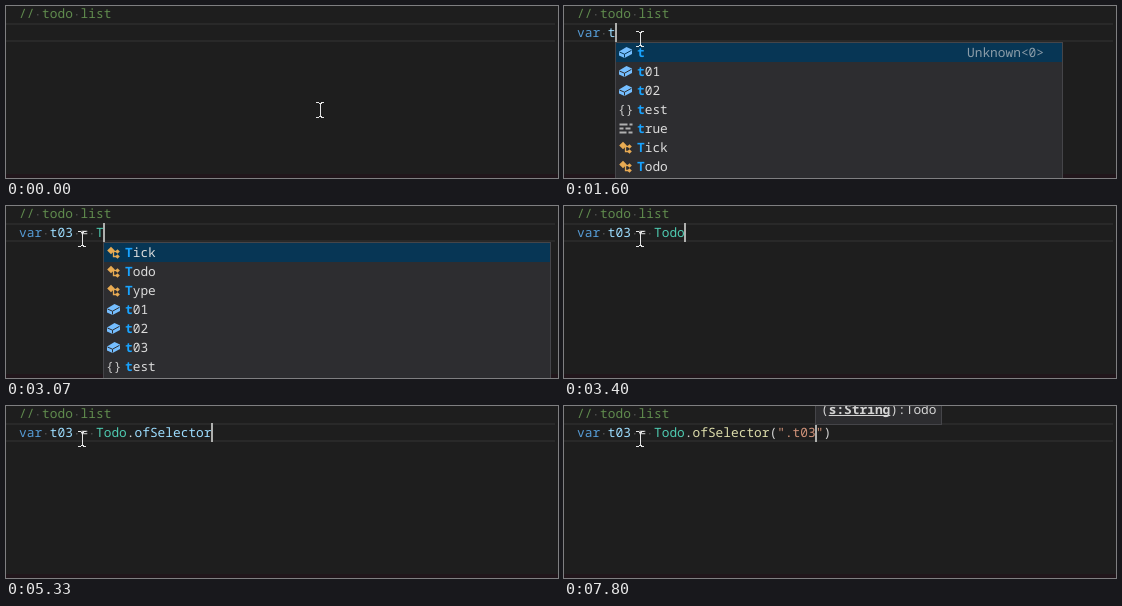
These frames come from a looping animation (552x172 px, 8 s). An HTML page with a canvas:

```html
<!DOCTYPE html>
<html lang="en">
<head>
<meta charset="utf-8">
<title>Code completion</title>
<style>
html, body { margin: 0; width: 552px; height: 172px; overflow: hidden; background: #1e1e1e; }
canvas { display: block; }
</style>
</head>
<body>
<canvas id="stage" width="552" height="172"></canvas>
<script>
const ctx = document.getElementById('stage').getContext('2d');
const LOOP = 8000, STEP = 200 / 3, LEFT = 13, CHAR = 7.7, ROW = 19;
const FONT = '12.83px "Noto Sans Mono", "DejaVu Sans Mono", monospace';
ctx.textRendering = 'geometricPrecision';

// [time, text before the cursor, text after it]
const edits = [
  [0, ''], [1000, 'v'], [1070, 'va'], [1270, 'var'], [1330, 'var '],
  [1470, 'var t'], [1730, 'var t0'], [1800, 'var t03'], [2070, 'var t03 '],
  [2270, 'var t03 ='], [2530, 'var t03 = '], [2930, 'var t03 = T'],
  [3130, 'var t03 = To'], [3330, 'var t03 = Tod'], [3400, 'var t03 = Todo'],
  [3870, 'var t03 = Todo.'], [5330, 'var t03 = Todo.ofSelector'],
  [5870, 'var t03 = Todo.ofSelector(', ')'],
  [6330, 'var t03 = Todo.ofSelector("', '")'],
  [7330, 'var t03 = Todo.ofSelector(".', '")'],
  [7470, 'var t03 = Todo.ofSelector(".t', '")'],
  [7670, 'var t03 = Todo.ofSelector(".t0', '")'],
  [7730, 'var t03 = Todo.ofSelector(".t03', '")'],
];
const cursorOff = [[0, 470], [930, 1000], [4330, 4800], [5800, 5870], [6930, 7330]];

const members = ['method create', 'method ofSelector'];
const lists = [
  { from: 1200, to: 1270, x: 28, match: 2, rows: ['keyword var', 'variable val'] },
  { from: 1600, to: 1730, x: 51, match: 1, detail: 'Unknown<0>',
    rows: ['variable t', 'variable t01', 'variable t02', 'braces test', 'keyword true', 'class Tick', 'class Todo', ''] },
  { from: 3070, to: 3130, x: 97, match: 1,
    rows: ['class Tick', 'class Todo', 'class Type', 'variable t01', 'variable t02', 'variable t03', 'braces test', ''] },
  { from: 3270, to: 3330, x: 105, match: 2, rows: ['class Todo', 'class Tools', 'class Token'] },
  { from: 3930, to: 4470, x: 112, rows: members, detail: 'create():Todo' },
  { from: 4470, to: 5330, x: 112, rows: members, selected: 1, detail: 'ofSelector(s:String):Todo' },
];
const hints = [[6070, 213], [6400, 220], [7330, 226], [7400, 228], [7530, 236], [7730, 243], [7800, 251]];

const latest = (list, t) => list.filter(e => e[0] <= t).pop();

function rect(x, y, w, h, color) {
  ctx.fillStyle = color;
  ctx.fillRect(x, y, w, h);
}

function frame(x, y, w, h, color) {
  ctx.strokeStyle = color;
  ctx.lineWidth = 1;
  ctx.strokeRect(x + .5, y + .5, w - 1, h - 1);
}

function text(s, x, y, color, weight = '') {
  ctx.font = weight + ' ' + FONT;
  ctx.fillStyle = color;
  ctx.fillText(s, x, y);
}

function path(points, color, { fill = false, close = fill, width = 1 } = {}) {
  ctx.beginPath();
  for (let i = 0; i < points.length; i += 2) ctx.lineTo(points[i], points[i + 1]);
  if (close) ctx.closePath();
  ctx.lineWidth = width;
  ctx.fillStyle = ctx.strokeStyle = color;
  fill ? ctx.fill() : ctx.stroke();
}

const diamond = (x, y, r, color) =>
  path([x - r, y, x, y - r, x + r, y, x, y + r], color, { fill: true });

const icons = {
  variable(bg) {
    path([-6.5, -1, 1, -5.5, 6.5, -3, 6.5, 1.5, -1, 5.5, -6.5, 3], '#75beff', { fill: true });
    path([-6, -.5, -1, 1.7, 6, -2.2], bg);
    path([-1, 1.7, -1, 5], bg);
  },
  method() {
    path([0, -6, 5.5, -3, 5.5, 3, 0, 6, -5.5, 3, -5.5, -3], '#b180d7', { close: true, width: 1.2 });
    path([-5, -2.8, 0, 0, 5, -2.8], '#b180d7');
    path([0, 0, 0, 6], '#b180d7');
  },
  class() {
    path([-1, -1, 4, -1], '#e8ab53', { width: 1.3 });
    path([0, -1, 0, 4, 4, 4], '#e8ab53', { width: 1.3 });
    diamond(-2.5, -2, 3.8, '#e8ab53');
    diamond(4, -1, 2.3, '#e8ab53');
    diamond(4, 4, 2.3, '#e8ab53');
  },
  braces() {
    text('{}', -7.5, 4.5, '#c5c5c5');
  },
  keyword() {
    rect(-6, -5, 8, 2, '#b0b0b0');
    rect(4, -5, 3, 2, '#b0b0b0');
    rect(-6, -1, 4, 2, '#b0b0b0');
    rect(0, -1, 5, 2, '#b0b0b0');
    rect(-6, 3, 7, 2, '#b0b0b0');
    rect(3, 3, 4, 2, '#b0b0b0');
  },
};

function tokenColor(token, next) {
  if (token[0] === '"') return '#ce9178';
  if (token === 'var') return '#569cd6';
  if (/^[A-Z]/.test(token)) return '#4ec9b0';
  if (/^\w/.test(token)) return next === '(' ? '#dcdcaa' : '#9cdcfe';
  return '#d4d4d4';
}

function code(line, y, color) {
  for (const m of line.matchAll(/"[^"]*"?|\w+|\S| /g)) {
    const x = LEFT + m.index * CHAR;
    if (m[0] === ' ') rect(Math.round(x + 3), y - 4, 1.5, 1.5, '#4a4a4a');
    else text(m[0], x, y, color || tokenColor(m[0], line[m.index + m[0].length]));
  }
}

function drawList({ x, rows, match = 0, selected = 0, detail }) {
  const width = 448, height = rows.length * ROW + 2;
  rect(x, 36, width, height, '#2d2d30');
  rows.forEach((row, i) => {
    if (!row) return;
    const y = 37 + i * ROW, bg = i === selected ? '#073655' : '#2d2d30';
    const [kind, name] = row.split(' ');
    rect(x + 1, y, width - 2, ROW, bg);
    ctx.save();
    ctx.translate(x + 10.5, y + 9.5);
    icons[kind](bg);
    ctx.restore();
    text(name.slice(0, match), x + 22, y + 14, '#18a3ff', 'bold');
    text(name.slice(match), x + 22 + match * CHAR, y + 14, '#dcdcdc');
    if (detail && i === selected)
      text(detail, x + width - 19 - detail.length * CHAR, y + 14, '#8b9ca8');
  });
  frame(x, 36, width, height, '#454549');
}

function drawHint(x) {
  rect(x, 0, 127, 19, '#2d2d30');
  frame(x, -1, 127, 20, '#454549');
  text('(', x + 6, 8, '#d4d4d4');
  text('s:String', x + 6 + CHAR, 8, '#d4d4d4', 'bold');
  rect(x + 6 + CHAR, 9, 8 * CHAR, 1, '#d4d4d4');
  text('):Todo', x + 6 + 9 * CHAR, 8, '#d4d4d4');
}

function drawPointer(t) {
  const n = Math.floor((t + 4) / STEP);
  const rest = 1 - Math.min(n / 5, 1);
  const lift = Math.max(0, Math.min(n - 6, 3));
  const x = Math.round(76 + 238 * rest * rest);
  const y = Math.round(36 + 68 * rest * rest) - lift;
  const beam = [[-4, -8, 3, 1], [1, -8, 3, 1], [0, -7, 1, 14], [-4, 7, 3, 1], [1, 7, 3, 1], [-1, -7, 1, 1], [1, -7, 1, 1], [-1, 6, 1, 1], [1, 6, 1, 1]];
  for (const [dx, dy, w, h] of beam) rect(x + dx, y + dy, w, h, '#e6e6e6');
}

function draw(t) {
  rect(0, 0, 552, 172, '#1e1e1e');
  rect(0, 168, 552, 4, '#21161b');
  rect(0, 17, 549, 2, '#292929');
  rect(0, 34, 549, 2, '#292929');

  const [, before, after = ''] = latest(edits, t);
  code('// todo list', 12, '#608b4e');
  // the call gets its own colour once the line is parsed again
  if (t >= 5870 && t < 5930) {
    code(before.slice(0, -1), 31);
    text('()', LEFT + (before.length - 1) * CHAR, 31, '#d4d4d4');
  } else code(before + after, 31);

  if (t >= 5930 && t < 6330) {
    frame(205, 18, 8, 17, '#707070');
    frame(213, 18, 8, 17, '#707070');
  }
  if (!cursorOff.some(([a, b]) => t >= a && t < b))
    rect(Math.floor(LEFT + before.length * CHAR), 17, 2, ROW, '#aeafad');

  const list = lists.find(l => t >= l.from && t < l.to);
  if (list) drawList(list);
  const hint = latest(hints, t);
  if (hint) drawHint(hint[1]);
  drawPointer(t);
}

const start = performance.now();
function tick() {
  draw((performance.now() - start) % LOOP);
  requestAnimationFrame(tick);
}
tick();
</script>
</body>
</html>
```
